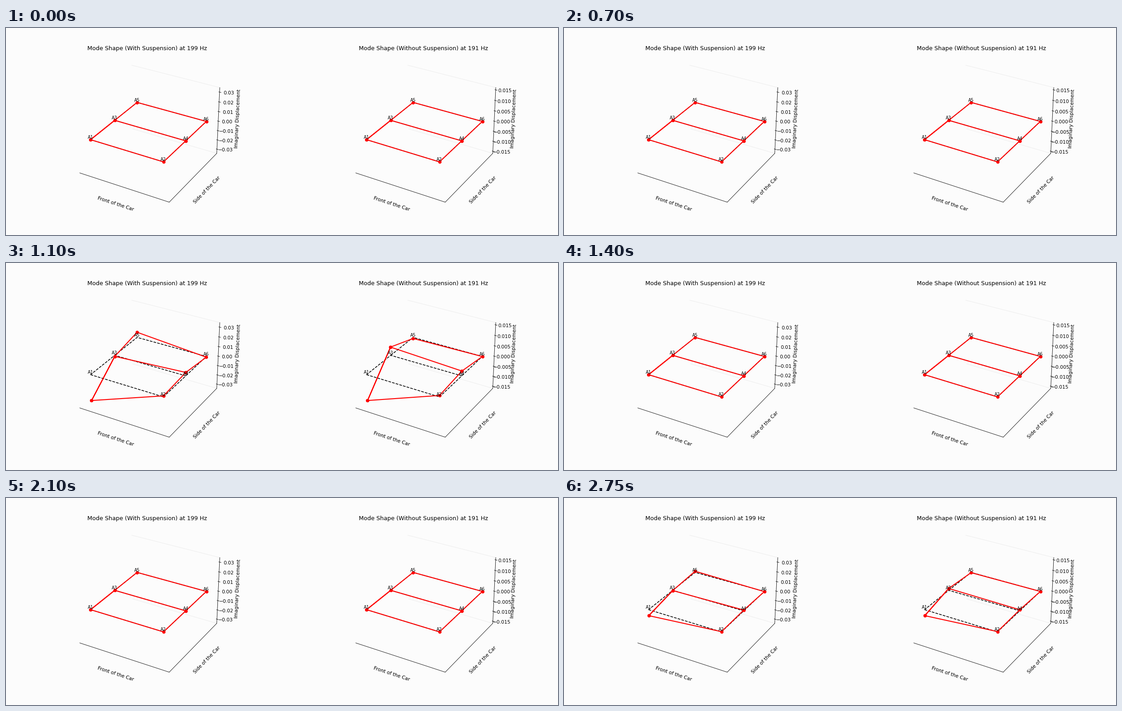
A matplotlib script for the animation above (2800 ms loop, 1222x458 px).

```python
import numpy as np
import matplotlib.pyplot as plt
from matplotlib.animation import FuncAnimation

W, H = 1222, 458
DPI = W / 16
FRAMES, INTERVAL, CYCLE = 56, 50, 28
BACKGROUND = "#fcfcfc"
SIDE = 0.77 * H

plt.rcParams["font.family"] = "DejaVu Sans"

# Sensors A1..A6: left/right pairs from front to back
X = np.array([0, 1, 0, 1, 0, 1], float)
Y = np.array([0, 0, 1, 1, 2, 2], float)
LOOP = [0, 1, 3, 2, 0]
REAR = [2, 4, 5, 3]
PATH = LOOP + REAR

# title, left edge, z limit, tick step, amplitudes relative to z limit / 1.25
MODES = [
    ("Mode Shape (With Suspension) at 199 Hz", 136.6, 0.0346, 0.01,
     [1, -0.038, 0.04, -0.13, -0.206, 0.03]),
    ("Mode Shape (Without Suspension) at 191 Hz", 747.6, 0.0161, 0.005,
     [1, -0.053, -0.32, -0.182, 0.042, 0.004]),
]

fig = plt.figure(figsize=(W / DPI, H / DPI), dpi=DPI, facecolor=BACKGROUND)


def style_axes(ax, title, zmax, step):
    ax.set_facecolor("none")
    ax.grid(False)
    ax.view_init(elev=30, azim=-60)
    ax.set_title(title, fontsize=12)
    ax.set_xlabel("Front of the Car", fontsize=10)
    ax.set_ylabel("Side of the Car", fontsize=10)
    ax.set_zlabel("Imaginary Displacement", fontsize=10)
    ax.set_xticks([])
    ax.set_yticks([])
    ax.set_zticks(np.arange(-3, 4) * step)
    ax.set_xlim(0.5 - 0.625, 0.5 + 0.625)
    ax.set_ylim(1 - 1.1458, 1 + 1.1458)
    ax.set_zlim(-zmax, zmax)
    edges = ((ax.xaxis, "none"), (ax.yaxis, "#eeeeee"), (ax.zaxis, "none"))
    for axis, color in edges:
        axis.pane.set(fill=False, alpha=None, edgecolor=color)


def build(title, left, zmax, step, shape):
    ax = fig.add_axes([left / W, 0.11, SIDE / W, 0.77], projection="3d")
    style_axes(ax, title, zmax, step)
    for part in (LOOP, REAR):
        ax.plot(X[part], Y[part], np.zeros(len(part)), "k--", lw=1.5)
    line, = ax.plot(X[PATH], Y[PATH], np.zeros(len(PATH)), "ro-", lw=2, ms=6)
    for i, (x, y) in enumerate(zip(X, Y), 1):
        ax.text(x, y, 0, f"A{i}", fontsize=9, ha="center", va="bottom")
    return line, np.array(shape)[PATH] * zmax / 1.25


parts = [build(*mode) for mode in MODES]


def update(frame):
    swing = np.sin(2 * np.pi * frame / CYCLE)
    for line, amp in parts:
        line.set_data_3d(X[PATH], Y[PATH], amp * swing)
    return [line for line, _ in parts]


anim = FuncAnimation(fig, update, frames=FRAMES, interval=INTERVAL,
                     repeat=True, repeat_delay=0, blit=False)
plt.show()
```
